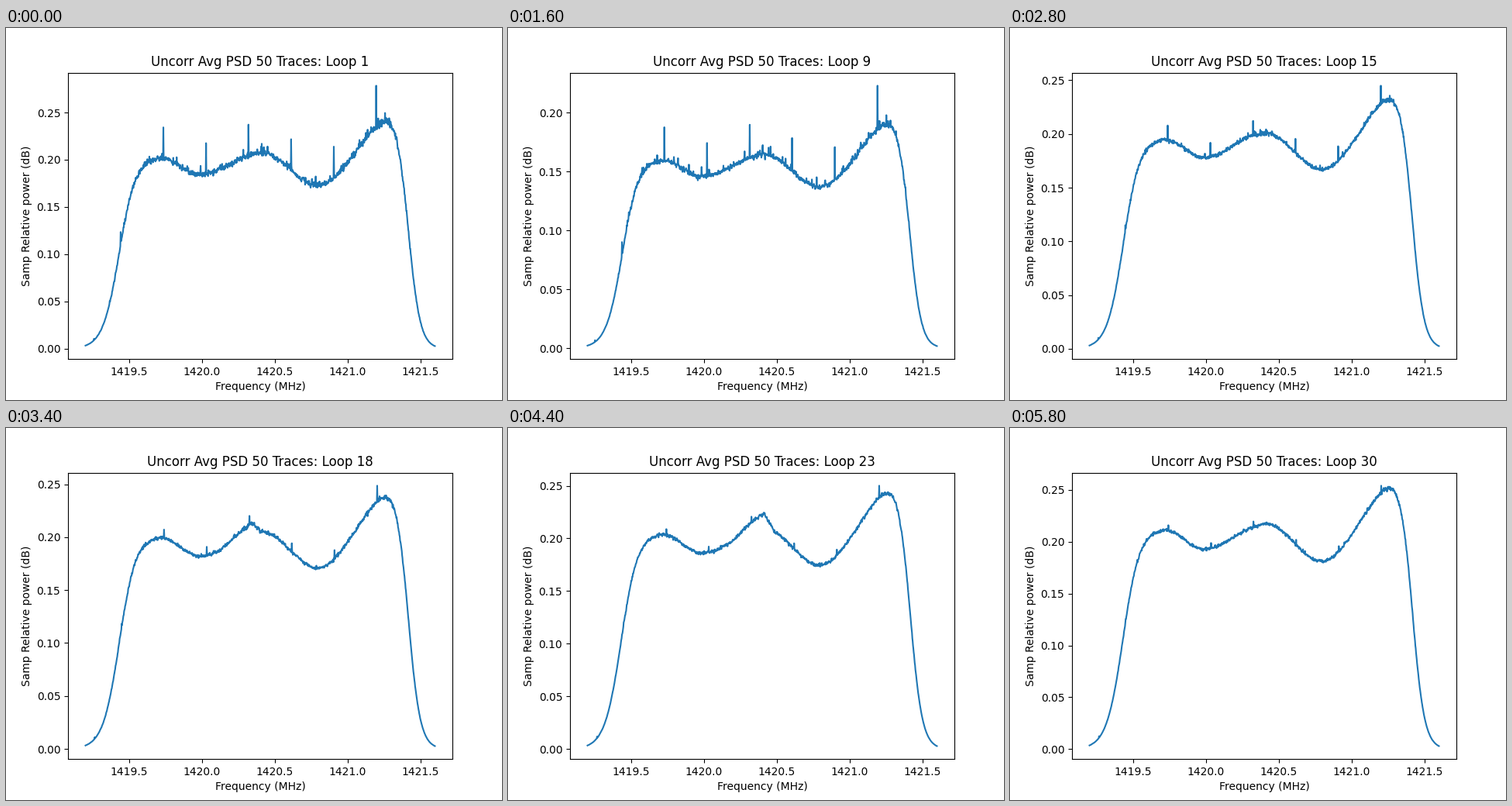
A matplotlib script for the animation above (6000 ms loop, 640 by 480 pixels).

```python
import numpy as np
import matplotlib.pyplot as plt
from matplotlib.animation import FuncAnimation

LOOPS, STEP_MS, SAMPLES = 30, 200, 1024
LEFT, WIDTH = 102.5, 451.2  # stage span of the band
pos = np.linspace(LEFT, LEFT + WIDTH, SAMPLES)
freq = np.linspace(1419.2, 1421.6, SAMPLES)

# Turning points of the passband ripple: stage x and power
RIPPLE = [(198, 0.205), (250, 0.186), (331, 0.2095), (402, 0.1745),
          (505, 0.252)]
# Gain and highest value along the run
KEYS = [1, 5, 9, 15, 21, 26, 30]
LEVEL = [0.99, 0.81, 0.784, 0.957, 1.0, 1.0, 1.037]
PEAK = [0.2784, 0.2339, 0.2228, 0.245, 0.2523, 0.2468, 0.2541]

COMB = 148 + 55 * np.arange(7)  # evenly spaced interference
clutter_rng = np.random.default_rng(4)
clutter = [(clutter_rng.uniform(160, 500), clutter_rng.uniform(0.1, 0.3))
           for _ in range(18)]


def logistic(t):
    return 1 / (1 + np.exp(-t))


def bell(t):
    return np.exp(-t * t)


def ripple(x):
    y = np.full_like(x, RIPPLE[0][1])
    for (x0, y0), (x1, y1) in zip(RIPPLE, RIPPLE[1:]):
        t = np.clip((x - x0) / (x1 - x0), 0, 1)
        y += (y1 - y0) * t * t * (3 - 2 * t)
    return y


window = logistic((pos - 146) / 10.6) * logistic((519.5 - pos) / 7.6)
band = ripple(pos) * window


def index(x):
    return int(round((x - LEFT) / WIDTH * (SAMPLES - 1)))


def spectrum(loop):
    rng = np.random.default_rng(100 + loop)
    level = np.interp(loop, KEYS, LEVEL)
    peak = np.interp(loop, KEYS, PEAK)
    fade = logistic((12.8 - loop) / 2.5)
    strength = 0.005 + 0.028 * fade
    drift = 1.3 - 2.6 * bell((loop - 7) / 7)

    base = band * level ** (2 - np.sqrt(window))
    low = base.min()
    # Passing sawtooth bump
    cx = 325 + 2.7 * (loop - 21)
    base += 0.018 * bell((loop - 21) / 4) * np.interp(
        pos, [cx - 40, cx, cx + 13], [0, 1, 0])

    y = base * (1 + (0.004 + 0.004 * fade) * rng.normal(size=SAMPLES))
    stray = rng.random(SAMPLES) < 0.04
    y += stray * rng.random(SAMPLES) * 0.2 * strength * window

    def spike(x, height):
        i = index(x + drift)
        y[i] = base[i] + height

    for x, gain in clutter:
        spike(x, gain * strength)
    for x in COMB:
        spike(x, strength * (0.4 if x == COMB[0] else 1))
    spike(113.5, 0.0015)

    y = np.clip(y, low, peak - 0.001)
    y[index(COMB[-1] + drift)] = peak
    return y


fig, ax = plt.subplots(figsize=(6.4, 4.8), dpi=100)


def draw(i):
    ax.clear()
    ax.plot(freq, spectrum(i + 1))
    ax.set_title(f"Uncorr Avg PSD 50 Traces: Loop {i + 1}")
    ax.set_xlabel("Frequency (MHz)")
    ax.set_ylabel("Samp Relative power (dB)")


anim = FuncAnimation(fig, draw, frames=LOOPS, interval=STEP_MS,
                     init_func=lambda: None, repeat=True, repeat_delay=0)
plt.show()
```
